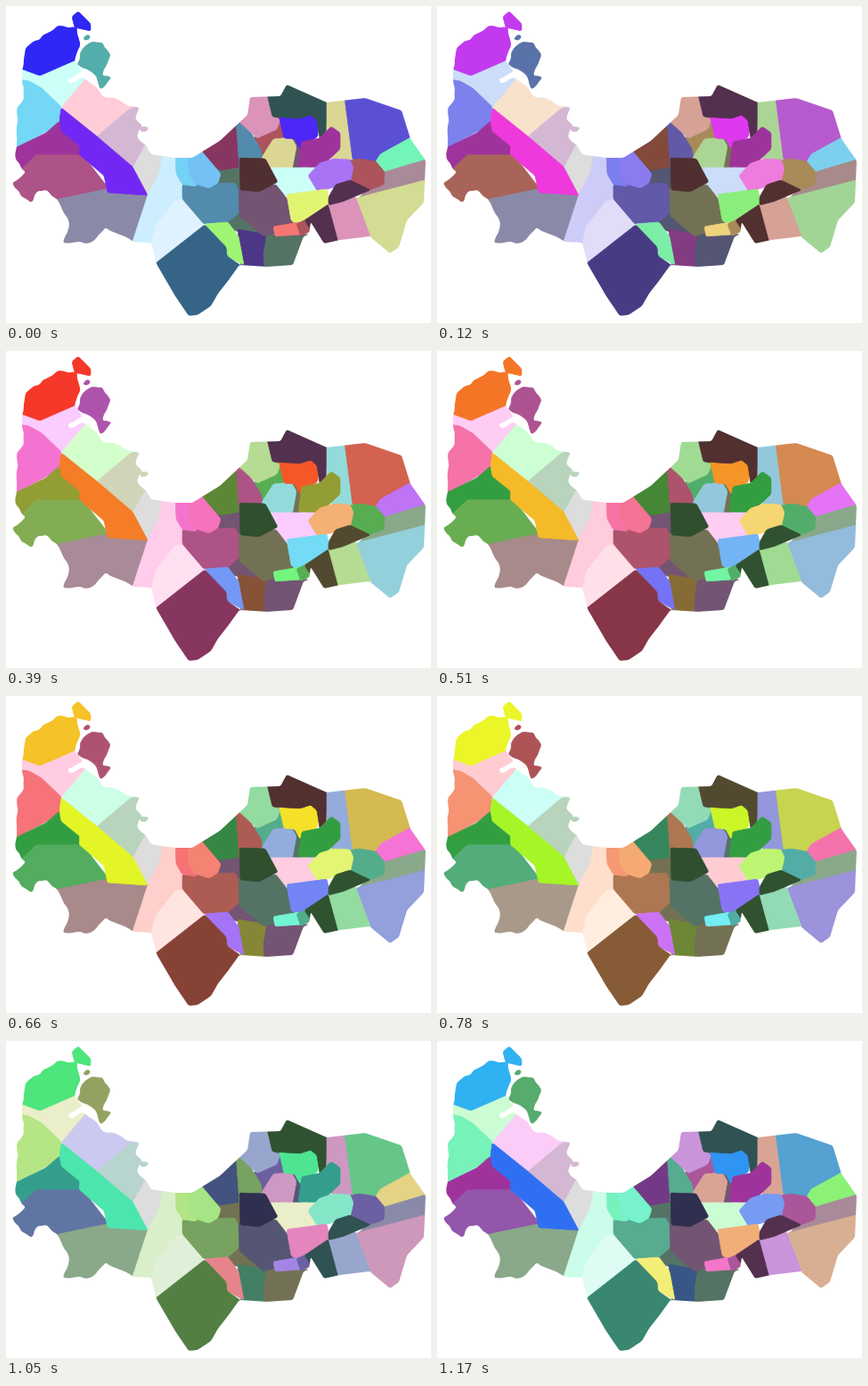
Write a matplotlib script that moves like this. It is 477x355 px and loops after 1.2 s.

```python
import colorsys

import matplotlib.pyplot as plt
import numpy as np
from matplotlib.animation import FuncAnimation
from matplotlib.patches import PathPatch
from matplotlib.path import Path

W, H, DPI = 477, 355, 64
FRAMES, INTERVAL = 40, 30

# Hue turn in degrees and colour strength at a few moments of the loop.
KEYS = (0, 7, 13, 26, 32, 39, 40)
TURN = (0, 76, 123, 181, 210, 318, 360)
STRENGTH = (1, .83, 1, 1, .66, .96, 1)

# Saturation, value and, for muted tones, the only hues they can show.
VIVID = (.84, .96, None)
BRIGHT = (.53, .96, None)
RICH = (.62, .83, None)
STRONG = (.52, .68, None)
DEEP = (.6, .53, None)
MISTY = (.33, .86, None)
PALE = (.2, 1, None)
SNOW = (.12, 1, None)
JEWEL = (.68, .62, (67, 128, 170, 301))
HAZE = (.13, .83, (67, 128, 170, 301))
SOFT = (.18, .66, (0, 30, 120, 240, 330))
MID = (.27, .45, (57, 153, 235, 302))
DARK = (.41, .32, (0, 47, 120, 180, 307))
UMBER = (.4, .31, (0, 120, 240))
GREY = (0, .866, None)

rng = np.random.default_rng(5)

fig = plt.figure(figsize=(W / DPI, H / DPI), dpi=DPI, facecolor="white")
ax = fig.add_axes([0, 0, 1, 1])
ax.set_xlim(0, W)
ax.set_ylim(H, 0)
ax.axis("off")

areas = []


def rounded(points, cut=2.2):
    """Closed outline with slightly softened corners."""
    pts = np.array(points, float)
    verts, codes = [], []
    for before, p, after in zip(np.roll(pts, 1, 0), pts, np.roll(pts, -1, 0)):
        ends = [p + (q - p) * min(.5, cut / np.hypot(*(q - p)))
                for q in (before, after)]
        verts += [ends[0], p, ends[1]]
        codes += [Path.LINETO, Path.CURVE3, Path.CURVE3]
    codes[0] = Path.MOVETO
    return Path(verts + [verts[0]], codes + [Path.CLOSEPOLY])


def rugged(points, step=6, size=1.3):
    """Break a line into short steps pushed sideways at random."""
    out = []
    for a, b in zip(points, points[1:]):
        a, d = np.array(a, float), np.subtract(b, a)
        length = np.hypot(*d)
        side = np.array([-d[1], d[0]]) / length
        out.append(a)
        for t in np.arange(step, length - step / 2, step) / length:
            out.append(a + d * t + side * rng.uniform(-size, size))
    return out


def area(hue, tone, *points):
    patch = PathPatch(rounded(points), lw=.7, joinstyle="round")
    ax.add_patch(patch)
    areas.append((patch, hue, tone))


def color(hue, tone, frame):
    sat, val, hues = tone
    hue = (hue + np.interp(frame, KEYS, TURN)) % 360
    if hues:
        hue = min(hues, key=lambda h: abs((h - hue + 180) % 360 - 180))
    else:
        strength = np.interp(frame, KEYS, STRENGTH)
        sat *= strength
        val *= .7 + .3 * strength if sat else 1
    return colorsys.hsv_to_rgb(hue / 360, sat, val)


# Areas run past the coast and under their later neighbours;
# the sea trims them at the end.

# West
area(172, PALE, (0, 60), (95, 50), (92, 85), (62, 115), (40, 95), (0, 82))
area(242, VIVID, (0, 0), (85, 0), (95, 52), (77, 61), (38, 78), (0, 64))
area(194, BRIGHT, (0, 80), (26, 84), (40, 92), (62, 113), (61, 132),
     (0, 165))
area(325, STRONG, (0, 160), (84, 164), (118, 208), (57, 217), (0, 235))
area(320, JEWEL, (0, 164), (45, 142), (60, 129), (90, 166), (34, 166),
     (0, 198))
area(205, SOFT, (50, 218), (113, 205), (162, 205), (143, 275), (40, 275))
area(347, PALE, (62, 114), (95, 75), (145, 111), (101, 147))
area(319, HAZE, (101, 147), (139, 115), (165, 105), (170, 150), (142, 182))
area(0, GREY, (142, 182), (156, 156), (182, 165), (172, 205), (159, 212))
area(262, VIVID, (62, 114), (102, 146), (142, 180), (159, 212), (114, 209),
     (110, 190), (82, 166), (83, 157), (62, 140), (60, 128))

# South-west
area(200, PALE, (176, 165), (212, 165), (215, 240), (163, 275), (140, 270),
     (159, 212), (172, 187))
area(205, SNOW, (163, 266), (168, 246), (190, 218), (210, 216), (226, 246),
     (168, 289))
area(190, MID, (228, 165), (264, 170), (264, 205), (232, 205))
area(190, MID, (248, 240), (262, 228), (302, 248), (293, 260), (250, 250))
area(203, STRONG, (198, 200), (257, 198), (263, 210), (262, 231),
     (248, 243), (222, 244), (198, 216))
area(196, BRIGHT, (190, 165), (212, 165), (214, 202), (198, 200), (191, 188))
area(328, DEEP, (214, 162), (262, 125), (264, 180), (240, 184), (225, 172))
area(204, BRIGHT, (204, 165), (219, 162), (241, 188), (238, 198),
     (228, 204), (212, 199), (205, 187))
area(258, DEEP, (260, 250), (294, 256), (290, 275), (293, 298), (264, 298))
area(100, BRIGHT, (223, 244), (249, 242), (261, 258), (267, 290),
     (248, 280), (238, 262))
area(206, DEEP, (163, 292), (223, 245), (247, 270), (248, 280), (264, 291),
     (250, 355), (190, 355))
area(190, MID, (293, 254), (340, 256), (335, 298), (290, 298), (289, 278))

# North-east
area(317, MID, (316, 148), (336, 150), (332, 184), (316, 184))
area(354, STRONG, (276, 150), (304, 122), (314, 124), (312, 149), (288, 172))
area(203, STRONG, (258, 125), (272, 137), (286, 160), (290, 182), (262, 182))
area(328, MISTY, (260, 128), (270, 95), (293, 101), (299, 124), (308, 127),
     (304, 138), (282, 148), (271, 138))
area(56, MISTY, (284, 184), (288, 168), (300, 149), (320, 147), (326, 157),
     (321, 184))
area(251, VIVID, (306, 122), (351, 122), (350, 146), (330, 160), (324, 149),
     (312, 148))
area(205, DARK, (292, 95), (315, 80), (362, 100), (359, 142), (352, 148),
     (349, 128), (342, 122), (330, 126), (299, 124))
area(56, MISTY, (360, 100), (381, 100), (391, 172), (366, 174), (360, 138))
area(320, JEWEL, (328, 180), (332, 152), (352, 148), (365, 135), (375, 142),
     (375, 160), (352, 182))
area(245, RICH, (379, 95), (460, 95), (462, 146), (420, 167), (414, 176),
     (389, 172))
area(152, BRIGHT, (414, 176), (420, 166), (460, 144), (478, 170), (425, 188))
area(328, SOFT, (424, 186), (478, 170), (478, 195), (395, 216), (410, 200))
area(172, PALE, (284, 181), (350, 181), (352, 207), (315, 213), (300, 206))
area(354, STRONG, (385, 173), (397, 171), (415, 174), (425, 186),
     (424, 200), (405, 207), (386, 204))
area(265, BRIGHT, (339, 190), (352, 176), (368, 171), (386, 172),
     (390, 181), (386, 198), (350, 208))

# Centre and south-east
area(317, MID, (261, 204), (303, 200), (328, 232), (328, 246), (289, 258),
     (262, 235))
area(69, BRIGHT, (315, 211), (360, 205), (364, 222), (328, 246), (320, 240))
area(335, UMBER, (262, 170), (291, 171), (305, 197), (284, 208), (263, 206))
area(2, BRIGHT, (300, 247), (329, 242), (331, 256), (302, 258))
area(354, STRONG, (326, 244), (341, 237), (345, 250), (331, 258))
area(66, MISTY, (393, 215), (478, 193), (478, 285), (420, 285), (402, 240))
area(318, DARK, (335, 240), (362, 222), (376, 262), (357, 272))
area(328, MISTY, (362, 222), (392, 213), (409, 258), (375, 270))
area(318, DARK, (362, 214), (370, 200), (386, 195), (409, 206), (378, 219),
     (362, 223))

# Coast, clockwise from the south-west corner
wild = [(143, 264), (112, 248), (95, 265), (64, 265), (71, 243), (57, 216),
        (45, 206), (36, 207), (28, 220), (17, 213), (7, 198), (22, 186),
        (11, 172), (12, 158), (13, 113), (20, 104), (18, 72), (22, 47),
        (47, 30), (58, 22), (80, 24), (83, 45), (77, 61), (86, 73), (69, 82),
        (72, 87), (87, 80), (101, 90), (108, 101), (124, 104), (138, 112),
        (150, 114), (145, 126), (153, 134), (147, 146), (157, 156),
        (166, 169)]
calm = [(190, 170), (209, 170), (240, 151), (271, 122), (274, 102),
        (308, 101), (315, 88), (360, 108), (403, 103), (444, 117),
        (454, 149), (471, 173), (469, 220), (450, 240), (441, 270),
        (431, 277), (408, 258), (375, 262), (357, 266), (342, 242),
        (340, 256), (334, 258), (322, 290), (293, 292), (262, 290),
        (249, 308), (238, 322), (230, 336), (215, 346), (205, 347),
        (190, 325), (169, 289), (163, 265)]
frame_box = Path([(-9, -9), (W + 9, -9), (W + 9, H + 9), (-9, H + 9),
                  (-9, -9)], closed=True)
coast = rounded((rugged(wild) + calm)[::-1])
ax.add_patch(PathPatch(Path.make_compound_path(frame_box, coast),
                       fc="white", lw=0))

# Islands
area(242, VIVID, (74, 12), (81, 6), (95, 20), (95, 28), (77, 24))
area(178, STRONG, (87, 36), (91, 32), (95, 34), (92, 38), (88, 38))
area(178, STRONG, *rugged([(86, 48), (97, 40), (108, 41), (117, 55),
                           (108, 78), (118, 80), (106, 93), (101, 78),
                           (80, 65), (86, 48)]))
area(319, HAZE, (149, 135), (160, 136), (158, 140), (152, 141))


def draw(frame):
    for patch, hue, tone in areas:
        patch.set_color(color(hue, tone, frame))
    return [item[0] for item in areas]


anim = FuncAnimation(fig, draw, frames=FRAMES, interval=INTERVAL,
                     repeat=True, repeat_delay=0, blit=False)
plt.show()
```
